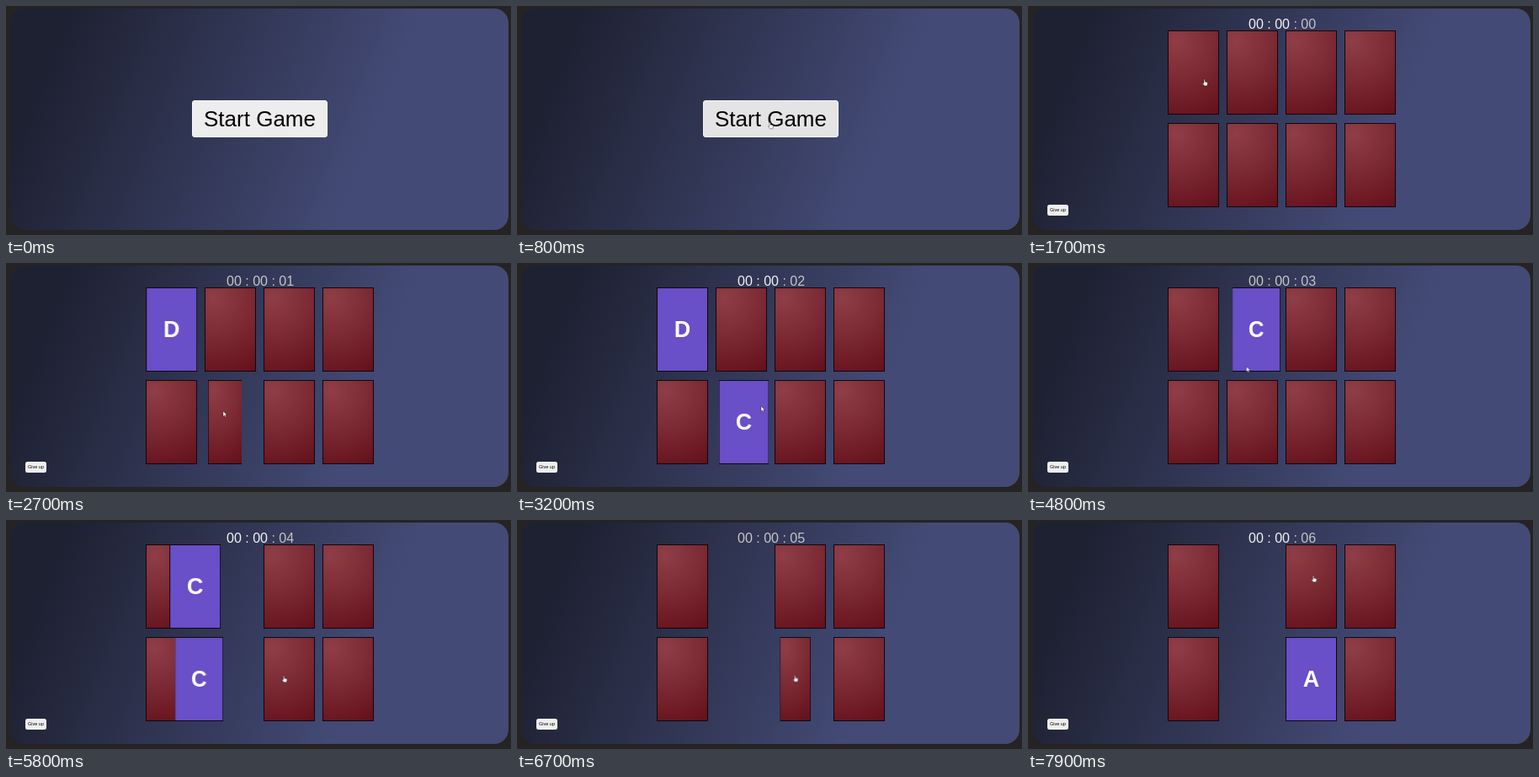
An HTML page that plays this animation: 600x272 px, repeating every 8 s.

```html
<!DOCTYPE html>
<html lang="en">
<head>
<meta charset="utf-8">
<title>Memory game</title>
<style>
  :root {
    --down: translateX(0) rotateY(0deg);
    --up: translateX(-100%) rotateY(-180deg);
  }
  html, body { margin: 0; width: 100%; height: 100%; overflow: hidden; background: #252323; }
  body { font-family: "Liberation Sans", Arial, sans-serif; }
  .stage { position: relative; width: 600px; height: 272px; overflow: hidden; }
  .panel, .start, .game, .timer, .quit, .slot, .card, .face, .cursor, .cursor svg { position: absolute; box-sizing: border-box; }
  .panel {
    left: 6px; top: 3px; width: 591px; height: 263px; border-radius: 17px;
    background: linear-gradient(112deg, #1e2132 10%, #434a75 70%);
  }

  /* One shared 8 s clock drives every part */
  .start, .game, .slot, .card, .cursor, .cursor svg {
    animation-duration: 8s; animation-iteration-count: infinite;
  }

  .start {
    left: 221px; top: 112px; width: 161px; height: 44px; border-radius: 3px;
    border: 1px solid #f6f6f6; background: #ededed; color: #000;
    font-size: 26px; line-height: 42px; text-align: center;
    animation-name: start; animation-timing-function: step-end;
  }
  .game { inset: 0; animation-name: game; animation-timing-function: step-end; }
  @keyframes start {
    0% { visibility: visible; background: #ededed; }
    7.5% { visibility: visible; background: #e4e4e4; }
    13.75%, 100% { visibility: hidden; }
  }
  @keyframes game {
    0% { visibility: hidden; }
    13.75%, 100% { visibility: visible; }
  }

  .timer {
    left: 262px; top: 12px; height: 20px; overflow: hidden; white-space: pre;
    font-size: 16px; line-height: 20px; color: #c4c4c4;
  }
  .timer span { display: inline-block; vertical-align: top; }
  .lead { animation: blink 2s step-end -0.9s infinite; }
  .digits { white-space: pre-line; animation: count 8s steps(8) -6.9s infinite; }
  @keyframes blink { 0% { color: #f4f4f4; } 50%, 100% { color: #c8c8c8; } }
  @keyframes count { to { transform: translateY(-100%); } }

  .quit {
    left: 23px; top: 236px; width: 25px; height: 13px; border-radius: 2.5px;
    background: #efefef; color: #000; font-size: 5.5px; line-height: 12.5px; text-align: center;
  }

  .slot { left: calc(166px + 70px * var(--c)); top: calc(29px + 110px * var(--r)); width: 61px; height: 100px; }
  .card { inset: 0; transform-style: preserve-3d; transform-origin: 100% 50%; animation-timing-function: ease; }
  .face { inset: 0; border: 1px solid #10060c; backface-visibility: hidden; }
  .back { background: radial-gradient(circle at 15% 12%, #8f3d47, #7c2a34 45%, #64101a 100%); }
  .front {
    transform: rotateY(180deg); background: #694fc8; color: #fff;
    font-weight: bold; font-size: 27px; line-height: 98px; text-align: center;
  }

  .d1 { animation-name: flip-d; }
  .c1 { animation-name: flip-c1; }
  .c2 { animation-name: flip-c2; }
  .a1 { animation-name: flip-a; }
  .matched { animation-name: leave; animation-timing-function: ease; }
  @keyframes flip-d {
    0%, 22.25% { transform: var(--down); }
    34.75%, 43.5625% { transform: var(--up); }
    56.0625%, 100% { transform: var(--down); }
  }
  @keyframes flip-c1 {
    0%, 52.25% { transform: var(--down); }
    64.75%, 100% { transform: var(--up); }
  }
  @keyframes flip-c2 {
    0%, 31.5% { transform: var(--down); }
    43.5625% { transform: var(--up); }
    56.0625%, 64.75% { transform: var(--down); }
    77.25%, 100% { transform: var(--up); }
  }
  @keyframes flip-a {
    0%, 81.25% { transform: var(--down); }
    93.75%, 100% { transform: var(--up); }
  }
  @keyframes leave {
    0%, 71% { transform: translateX(0); }
    73.5% { opacity: 1; }
    79.5% { opacity: 0; }
    80.375%, 100% { transform: translateX(-200px); opacity: 0; }
  }

  .cursor { left: 0; top: 0; animation-name: move; animation-timing-function: ease-in-out; }
  .cursor svg { left: 0; top: 0; overflow: visible; animation-timing-function: step-end; }
  .arrow { animation-name: arrow; }
  .hand { animation-name: hand; }
  @keyframes move {
    0%, 2.5% { transform: translate(340px, 184px); }
    8.75%, 13.75% { transform: translate(300px, 138px); }
    20%, 23% { transform: translate(209px, 87px); }
    29%, 34.5% { transform: translate(258px, 176px); }
    40% { transform: translate(290px, 170px); }
    47% { transform: translate(263px, 168px); }
    51.5%, 54% { transform: translate(262px, 85px); }
    60% { transform: translate(259.5px, 123px); }
    64%, 66% { transform: translate(262px, 180px); }
    72%, 83% { transform: translate(329.5px, 185px); }
    98%, 100% { transform: translate(338.5px, 66px); }
  }
  @keyframes arrow {
    0% { opacity: 0; }
    2.5% { opacity: 1; }
    7.5% { opacity: 0; }
    13.75% { opacity: 1; }
    18% { opacity: 0; }
    28% { opacity: 1; }
    42% { opacity: 0; }
    58.75% { opacity: 1; }
    61.5%, 100% { opacity: 0; }
  }
  @keyframes hand {
    0% { opacity: 0; }
    7.5% { opacity: 1; }
    13.75% { opacity: 0; }
    18% { opacity: 1; }
    28% { opacity: 0; }
    42% { opacity: 1; }
    58.75% { opacity: 0; }
    61.5%, 100% { opacity: 1; }
  }
</style>
</head>
<body>
<div class="stage">
  <div class="panel"></div>
  <div class="start">Start Game</div>
  <div class="game">
    <div class="timer"><span class="lead">00 : 00</span><span> : 0</span><span class="digits">0
1
2
3
4
5
6
7</span></div>
    <div class="quit">Give up</div>
  </div>
  <div class="cursor">
    <svg class="arrow" width="6" height="9"><path d="M0 0V6.2L1.5 4.9L2.5 7.1L3.5 6.6L2.6 4.5H4.5Z" fill="#fff" stroke="#111" stroke-width=".4"/></svg>
    <svg class="hand" width="7" height="9"><path d="M0 .6Q.6-.3 1.2.6V3L3.6 3.5Q4.6 3.8 4.4 5L3.8 7.8H.6L-1.6 4.9Q-1.4 4 0 5Z" fill="#fff" stroke="#111" stroke-width=".4"/></svg>
  </div>
</div>
<script>
  const game = document.querySelector(".game");
  const deck = [
    ["D", "d1"], ["C", "c1"], ["A", ""], ["B", ""],
    ["B", ""], ["C", "c2"], ["A", "a1"], ["D", ""]
  ];
  deck.forEach(([letter, motion], i) => {
    const slot = document.createElement("div");
    slot.className = letter === "C" ? "slot matched" : "slot";
    slot.style.setProperty("--c", i % 4);
    slot.style.setProperty("--r", Math.floor(i / 4));
    slot.innerHTML = `<div class="card ${motion}"><div class="face back"></div><div class="face front">${letter}</div></div>`;
    game.append(slot);
  });
</script>
</body>
</html>
```
